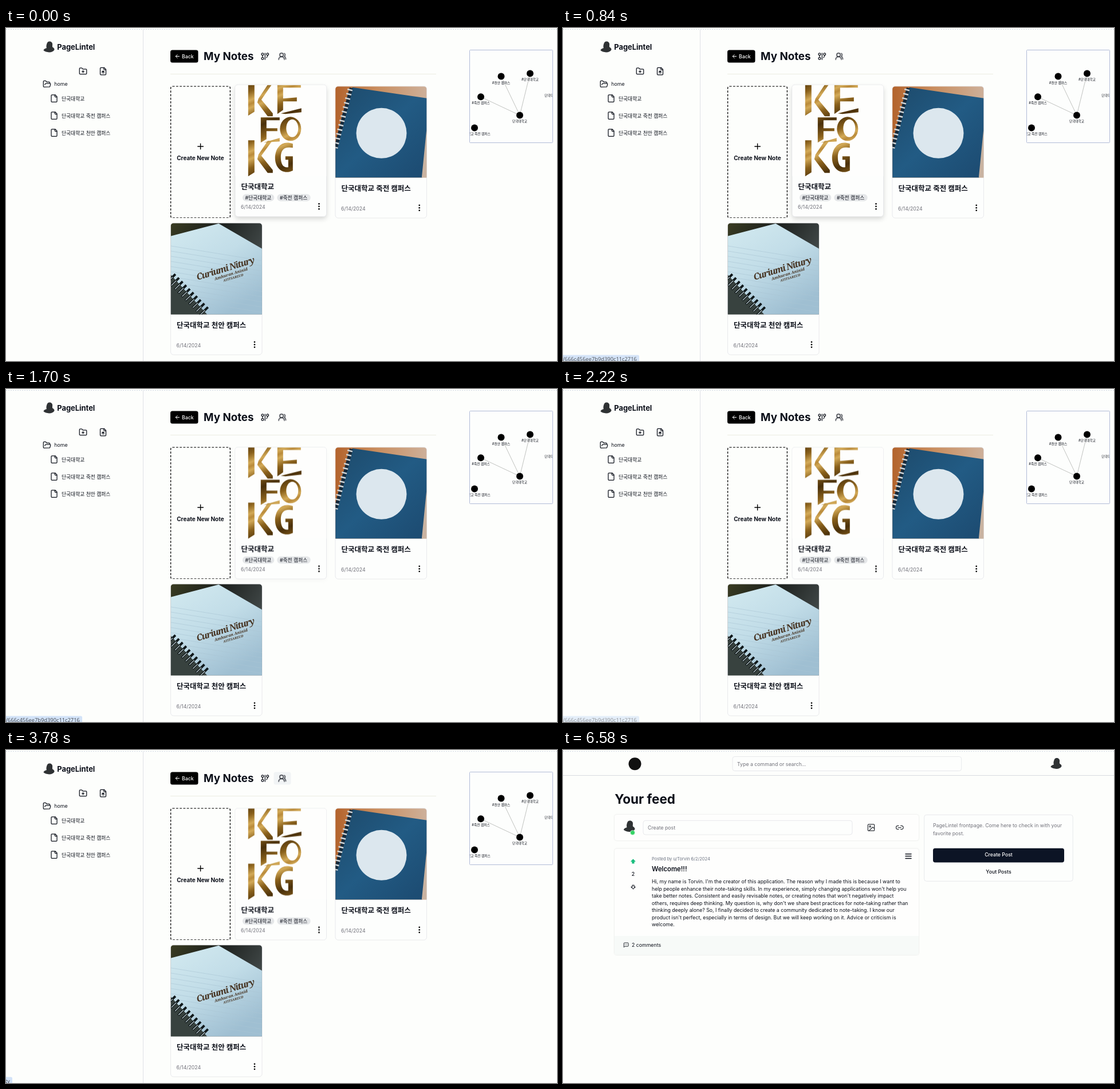
Write an HTML page that moves like this. It is 962 px wide and 582 px high and loops after 8 s.

```html
<!DOCTYPE html>
<html lang="ko">
<head>
<meta charset="utf-8">
<title>Notes and feed</title>
<style>
html, body { margin: 0; width: 100%; height: 100%; overflow: hidden; background: #fdfefc; }
svg.stage { display: block; width: 962px; height: 582px; }
text { font-family: Inter, "Noto Sans CJK KR", "Noto Sans CJK", sans-serif; font-size: 8.75px; fill: #0b0f19; white-space: pre; }
.b { font-weight: 700; }
.sb { font-weight: 600; }
.m { font-weight: 500; }
.mid { text-anchor: middle; }
.end { text-anchor: end; }
.grey { fill: #71717a; }
.white { fill: #fff; }
.title { font-size: 12.5px; font-weight: 600; }
.graph text { font-size: 5.7px; text-anchor: middle; }
.status text { font-family: "Noto Sans", "Open Sans", sans-serif; font-size: 9.3px; fill: #4b5158; }
.status path { fill: #d3e3f8; }
.icon { fill: none; stroke: #0b0f19; stroke-width: 2; stroke-linecap: round; stroke-linejoin: round; }
.box { fill: #fdfefd; stroke: #e2e4e8; stroke-width: .8; }
.soft { filter: drop-shadow(0 .7px 1.2px rgba(0,0,0,.13)); }
.dashed { box-sizing: border-box; width: 168px; height: 370px; border: 2px dashed #000; border-radius: 6px; }
.script text { font: italic 700 15.6px "Noto Serif", serif; fill: #463321; }

#notes, #feed, #hover, #chip, #link, #lift, #shade, #logo { animation: 8s linear infinite; }
#notes, #feed, #hover, #logo { animation-timing-function: step-end; }
#notes { animation-name: notes; }
#feed { animation-name: feed; }
#hover { animation-name: hover; }
#logo { animation-name: logo; }
#link { animation-name: link; }
#chip { animation-name: chip; }
#lift { animation-name: lift; }
#shade { animation-name: shade; }
@keyframes notes { 0% { visibility: visible } 59.25%, 100% { visibility: hidden } }
@keyframes feed { 0% { visibility: hidden } 59.25%, 100% { visibility: visible } }
@keyframes hover { 0% { opacity: 0 } 47.25%, 100% { opacity: 1 } }
@keyframes logo { 0% { opacity: 0 } 61.5%, 100% { opacity: 1 } }
@keyframes link { 0%, 3.5% { opacity: 0 } 11%, 24.25% { opacity: 1 } 32.5%, 100% { opacity: 0 } }
@keyframes chip { 0%, 47.24% { opacity: 0 } 47.25%, 70.25% { opacity: 1 } 75.25%, 100% { opacity: 0 } }
@keyframes lift {
  0%, 14% { transform: translateY(-2.5px); animation-timing-function: ease-in-out }
  22.75%, 100% { transform: none }
}
@keyframes shade { 0%, 14% { opacity: 1 } 22.75%, 100% { opacity: 0 } }
</style>
</head>
<body>
<svg class="stage" viewBox="0 0 962 582">
<defs>
  <symbol id="file" viewBox="0 0 24 24"><path d="M15 2H6a2 2 0 0 0-2 2v16a2 2 0 0 0 2 2h12a2 2 0 0 0 2-2V7ZM14 2v4a2 2 0 0 0 2 2h4"/></symbol>
  <symbol id="folder-plus" viewBox="0 0 24 24"><path d="M12 10v6M9 13h6M20 20a2 2 0 0 0 2-2V8a2 2 0 0 0-2-2h-7.9a2 2 0 0 1-1.69-.9L9.6 3.9A2 2 0 0 0 7.93 3H4a2 2 0 0 0-2 2v13a2 2 0 0 0 2 2Z"/></symbol>
  <symbol id="folder-open" viewBox="0 0 24 24"><path d="m6 14 1.5-2.9A2 2 0 0 1 9.24 10H20a2 2 0 0 1 1.94 2.5l-1.54 6a2 2 0 0 1-1.95 1.5H4a2 2 0 0 1-2-2V5a2 2 0 0 1 2-2h3.9a2 2 0 0 1 1.69.9l.81 1.2a2 2 0 0 0 1.67.9H18a2 2 0 0 1 2 2v2"/></symbol>
  <symbol id="graph" viewBox="0 0 24 24"><circle cx="5" cy="6" r="3"/><path d="M5 9v6"/><circle cx="5" cy="18" r="3"/><path d="M12 3v18"/><circle cx="19" cy="6" r="3"/><path d="M16 15.7A9 9 0 0 0 19 9"/></symbol>
  <symbol id="users" viewBox="0 0 24 24"><path d="M18 21a8 8 0 0 0-16 0"/><circle cx="10" cy="8" r="5"/><path d="M22 20c0-3.37-2-6.5-4-8a5 5 0 0 0-.45-8.3"/></symbol>
  <symbol id="image" viewBox="0 0 24 24"><rect x="3" y="3" width="18" height="18" rx="2"/><circle cx="9" cy="9" r="2"/><path d="m21 15-3.1-3.1a2 2 0 0 0-2.8 0L6 21"/></symbol>
  <symbol id="chain" viewBox="0 0 24 24"><path d="M9 17H7A5 5 0 0 1 7 7h2M15 7h2a5 5 0 1 1 0 10h-2M8 12h8"/></symbol>
  <symbol id="vote" viewBox="0 0 24 24"><path d="M9 18v-6H5l7-7 7 7h-4v6Z"/></symbol>
  <symbol id="comment" viewBox="0 0 24 24"><path d="M21 15a2 2 0 0 1-2 2H7l-4 4V5a2 2 0 0 1 2-2h14a2 2 0 0 1 2 2ZM8 10h.01M12 10h.01M16 10h.01"/></symbol>
  <symbol id="avatar" viewBox="0 0 20 20"><path fill="#2f3234" d="M10.5.6c3.600-.4 6 2.300 5.600 5.700-.1 2.200-.6 3.300.5 4.400 1.900 1 3.100 2.500 2.900 4.300-1.500 3-5.200 4.600-9.300 4.500-4-.1-7.200-1.300-9.800-3.400.6-2.200 2.700-3.200 5.500-4.100C5 9.600 5.500 6.600 6.500 4 7.300 2 8.500.8 10.500.6Z"/></symbol>
  <g id="dots"><circle r="1.35" cy="-4.5"/><circle r="1.35"/><circle r="1.35" cy="4.5"/></g>
  <clipPath id="photo"><path d="M.4 160V5A4.600 4.600 0 0 1 5 .4H155A4.600 4.600 0 0 1 159.600 5V160Z"/></clipPath>
  <clipPath id="map"><rect x="810" y="39" width="144" height="161"/></clipPath>
  <linearGradient id="gold" gradientUnits="userSpaceOnUse" x1="0" y1="0" x2="16" y2="38" spreadMethod="reflect">
    <stop offset="0" stop-color="#4a300a"/><stop offset=".5" stop-color="#8a611c"/><stop offset=".85" stop-color="#d3aa58"/><stop offset="1" stop-color="#b98a3a"/>
  </linearGradient>
  <linearGradient id="cover" x2="1" y2="1"><stop offset="0" stop-color="#1d4a6b"/><stop offset=".5" stop-color="#225b84"/><stop offset="1" stop-color="#1c4a70"/></linearGradient>
  <linearGradient id="wood" x2="1"><stop offset="0" stop-color="#b3632c"/><stop offset=".45" stop-color="#c98d5e"/><stop offset="1" stop-color="#cdb09a"/></linearGradient>
  <linearGradient id="paper" x2=".6" y2="1"><stop offset="0" stop-color="#d3eaf0"/><stop offset=".5" stop-color="#c2dde8"/><stop offset="1" stop-color="#9fbfd2"/></linearGradient>
  <linearGradient id="desk" x2="1" y2=".6"><stop offset="0" stop-color="#3a3c22"/><stop offset=".4" stop-color="#1b1f1c"/><stop offset="1" stop-color="#4d5556"/></linearGradient>
</defs>

<rect width="962" height="582" fill="#fdfefc"/>

<g id="notes">
  <path d="M239.5 3V582" stroke="#dfe1e6"/>
  <use href="#avatar" x="65" y="23" width="20" height="20"/>
  <text class="b" x="89.3" y="37.5" style="font-size:12.9px">PageLintel</text>
  <g class="icon">
    <use href="#folder-plus" x="127" y="68" width="15" height="15"/>
    <use href="#file" x="162" y="68" width="15" height="15"/>
    <path d="M169.5 79.300v-4.300m-2 2 2-2 2 2" stroke-width="1.25"/>
    <use href="#folder-open" x="64" y="90.5" width="15" height="15"/>
    <use href="#file" x="76.5" y="115.5" width="15" height="15"/>
    <use href="#file" x="76.5" y="145.5" width="15" height="15"/>
    <use href="#file" x="76.5" y="175.5" width="15" height="15"/>
  </g>
  <text x="84.3" y="101.2">home</text>
  <text x="97" y="126.5">단국대학교</text>
  <text x="97" y="156.5">단국대학교 죽전 캠퍼스</text>
  <text x="97" y="186.5">단국대학교 천안 캠퍼스</text>

  <rect x="287" y="38.5" width="48.5" height="22" rx="3.5" fill="#000"/>
  <path d="M302.5 49.5h-6.300m3-3-3 3 3 3" fill="none" stroke="#fff" stroke-linecap="round" stroke-linejoin="round"/>
  <text class="m white" x="307" y="52.6">Back</text>
  <text class="b" x="345" y="56.1" style="font-size:18.75px">My Notes</text>
  <rect id="hover" x="467.5" y="38.5" width="30" height="22" rx="3.5" fill="#f1f4f5"/>
  <g class="icon">
    <use href="#graph" x="444.8" y="42" width="15" height="15"/>
    <use href="#users" x="474.8" y="42" width="15" height="15"/>
  </g>
  <path d="M287 80.5H751" stroke="#ecece2"/>

  <foreignObject width="168" height="370" transform="translate(287 101.2) scale(.625)"><div class="dashed"></div></foreignObject>
  <path d="M334.8 207h9.600M339.6 202.200v9.600" stroke="#000" stroke-width="1.4" stroke-linecap="round"/>
  <text class="b mid" x="339.5" y="230.6" style="font-size:10px">Create New Note</text>

  <g id="lift">
    <rect id="shade" x="400" y="102" width="159.5" height="230" rx="5" fill="#fff" style="filter:drop-shadow(0 4px 4px rgba(0,0,0,.16))"/>
    <rect class="box" x="400" y="101.6" width="159.5" height="230.5" rx="5"/>
    <g transform="translate(399.8 101.8)" clip-path="url(#photo)">
      <rect width="160" height="160" fill="#fefefd"/>
      <g fill="url(#gold)">
        <path d="M23 0H34V47L23 54ZM41 24 57 0H64L46 26 66 50V55H57L39 31Z"/>
        <path d="M74 0H84V44L74 51ZM84 0H115V5H84ZM84 24 108 22V29H84ZM80 50 116 41V48L88 51Z"/>
        <path d="M45 57H55V95L45 101ZM55 57H78V62H55ZM55 76H74V81H55ZM50 101 78 93V99Z"/>
        <path d="M23 97H34V153L23 160ZM41 122 57 98H65L46 124 66 149V154H57L39 130Z"/>
        <ellipse cx="97" cy="77" rx="18.5" ry="21"/>
        <path d="M101 103C82 96 70 110 70 128S84 158 101 150V125H88V131H93V144Q80 146 80 126T101 110Z"/>
      </g>
      <ellipse cx="100" cy="76" rx="10.500" ry="15.500" fill="#fefefd"/>
    </g>
    <text class="title" x="410.5" y="284.5">단국대학교</text>
    <rect x="413" y="292.7" width="55.3" height="12.5" rx="6.2" fill="#e5e7e9"/>
    <rect x="473.3" y="292.7" width="58.3" height="12.5" rx="6.2" fill="#e5e7e9"/>
    <text x="417.5" y="302.2">#단국대학교</text>
    <text x="478" y="302.2">#죽전 캠퍼스</text>
    <text class="grey" x="410" y="318.6">6/14/2024</text>
    <use href="#dots" x="546.5" y="314.3"/>
  </g>

  <rect class="box" x="575" y="101.6" width="159.5" height="230.5" rx="5"/>
  <g transform="translate(574.8 101.8)" clip-path="url(#photo)">
    <rect width="160" height="160" fill="url(#wood)"/>
    <path d="M30 2 160 21V77L152 160H0V112L12 50Z" fill="url(#cover)"/>
    <path d="M160 70V160H151Z" fill="#c9b3a1"/>
    <path d="M28 3Q15 52 1 108" fill="none" stroke="#172b3c" stroke-width="6"/>
    <path d="M26 5Q14 52 0 108" fill="none" stroke="#cfd5d8" stroke-width="9" stroke-dasharray="2.6 5.4"/>
    <circle cx="80.7" cy="82" r="44" fill="#dce7ee"/>
  </g>
  <text class="title" x="585.5" y="284.5">단국대학교 죽전 캠퍼스</text>
  <text class="grey" x="585" y="318.6">6/14/2024</text>
  <use href="#dots" x="721.7" y="314.3"/>

  <rect class="box" x="287.5" y="340.6" width="159.5" height="230.5" rx="5"/>
  <g transform="translate(287.3 340.8)" clip-path="url(#photo)">
    <rect width="160" height="160" fill="url(#desk)"/>
    <path d="M0 23 84 1 160 45V160H62L0 92Z" fill="url(#paper)"/>
    <path d="M0 40 160 66M0 49 160 75M0 58 160 84M0 67 160 93M0 76 160 102M0 85 160 111M8 95 160 120M18 106 160 129M30 117 160 138M40 128 160 147M50 139 160 156" stroke="#a9c4d3" stroke-width=".6"/>
    <path d="M0 90 64 160H0Z" fill="#38423f"/>
    <path d="M0 95 62 158" stroke="#10181a" stroke-width="20" stroke-dasharray="4 5"/>
    <path d="M-1 98 59 160" stroke="#aebcc0" stroke-width="12" stroke-dasharray="1.4 7.6"/>
    <g class="script" transform="translate(47 100) rotate(-17)">
      <text style="letter-spacing:-1.3px">Curiumi Nitury</text>
      <text x="29" y="9" style="font-size:7px">Amhuran Aninid</text>
      <text x="43" y="16" style="font-size:5.5px">ATITSAREUD</text>
    </g>
  </g>
  <text class="title" x="298" y="523.5">단국대학교 천안 캠퍼스</text>
  <text class="grey" x="297.5" y="557.5">6/14/2024</text>
  <use href="#dots" x="434" y="553.3"/>

  <rect x="809.5" y="38.5" width="145" height="162" rx="1" fill="#fdfefd" stroke="#a9b4d3" stroke-width=".9"/>
  <g class="graph" clip-path="url(#map)">
    <path d="M864.5 84.5 897 152.5 915 79.5M829 120.5 897 152.5" fill="none" stroke="#b9bbb8" stroke-width=".9"/>
    <circle cx="864.5" cy="84.5" r="6"/><circle cx="915" cy="79.5" r="6"/><circle cx="829" cy="120.3" r="6"/>
    <circle cx="897" cy="152.5" r="6"/><circle cx="818" cy="174.5" r="6"/>
    <text x="864.5" y="97.5">#천안 캠퍼스</text>
    <text x="915" y="92.3">#단국대학교</text>
    <text x="829" y="133.2">#죽전 캠퍼스</text>
    <text x="897" y="165.3">단국대학교</text>
    <text x="818" y="187.2">단국대학교 죽전 캠퍼스</text>
    <text x="968" y="119.5">단국대학교 천안 캠퍼스</text>
  </g>

  <g id="link" class="status">
    <path d="M0 571.5H130.500a2.500 2.500 0 0 1 2.500 2.500V582H0Z"/>
    <text class="end" x="128.8" y="581.8">/666c456ee7b9d390c11c2716</text>
  </g>
</g>

<g id="feed">
  <path d="M0 44.5H962" stroke="#d9dbe0"/>
  <circle id="logo" cx="125.5" cy="24.3" r="11" fill="#111"/>
  <rect class="box" x="296" y="11.5" width="399.7" height="25" rx="4"/>
  <text class="grey" x="304" y="27.5">Type a command or search...</text>
  <use href="#avatar" x="851" y="13.5" width="20" height="20"/>
  <text class="b" x="90.3" y="93.6" style="font-size:22.5px">Your feed</text>

  <rect class="soft" x="90" y="113" width="531" height="45" rx="4" fill="#fefefd"/>
  <use href="#avatar" x="105.5" y="123" width="20.5" height="20.5"/>
  <circle cx="121.5" cy="144.4" r="4" fill="#34d365" stroke="#fff" stroke-width=".6"/>
  <rect class="box" x="140" y="123.3" width="365" height="24.7" rx="4"/>
  <text class="grey" x="148" y="139.2">Create post</text>
  <g class="icon" style="stroke:#33373d">
    <use href="#image" x="530.5" y="128" width="15" height="15"/>
    <use href="#chain" x="580.3" y="128" width="15" height="15"/>
  </g>

  <rect class="soft" x="90" y="172.5" width="531" height="185.5" rx="4" fill="#fefefd"/>
  <path d="M90 325H621V354a4 4 0 0 1-4 4H94a4 4 0 0 1-4-4Z" fill="#f7faf8"/>
  <g class="icon">
    <use href="#vote" x="116.2" y="188.5" width="12.5" height="12.5" style="fill:#18bd7d;stroke:#18bd7d"/>
    <use href="#vote" transform="rotate(180 122.5 239.3)" x="116.2" y="233" width="12.5" height="12.5"/>
    <use href="#comment" x="105" y="335.7" width="10.5" height="10.5"/>
    <path d="M598 181.7h10M598 185.6h10M598 189.5h10" stroke-width="1.5"/>
  </g>
  <text class="m mid" x="122.5" y="220.2">2</text>
  <text x="155" y="193" style="font-size:7.5px;fill:#6b7280">Posted by u/Torvin 6/2/2024</text>
  <text class="sb" x="155" y="212.2" style="font-size:11.25px">Welcome!!!</text>
  <text x="155" y="233.2">Hi, my name is Torvin. I'm the creator of this application. The reason why I made this is because I want to</text>
  <text x="155" y="245.7">help people enhance their note-taking skills. In my experience, simply changing applications won't help you</text>
  <text x="155" y="258.2">take better notes. Consistent and easily revisable notes, or creating notes that won't negatively impact</text>
  <text x="155" y="270.7">others, requires deep thinking. My question is, why don't we share best practices for note-taking rather than</text>
  <text x="155" y="283.2">thinking deeply alone? So, I finally decided to create a community dedicated to note-taking. I know our</text>
  <text x="155" y="295.7">product isn't perfect, especially in terms of design. But we will keep working on it. Advice or criticism is</text>
  <text x="155" y="308.2">welcome.</text>
  <text x="120" y="344.2">2 comments</text>

  <rect class="box" x="630.7" y="113.3" width="259.5" height="116" rx="4"/>
  <text class="grey" x="646" y="134.5">PageLintel frontpage. Come here to check in with your</text>
  <text class="grey" x="646" y="149.3">favorite post.</text>
  <rect x="646" y="171.8" width="229" height="24.7" rx="3.7" fill="#0c1425"/>
  <text class="m mid white" x="760.5" y="186.4">Create Post</text>
  <text class="m mid" x="760.5" y="216.3">Yout Posts</text>
</g>

<g id="chip" class="status">
  <path d="M0 571.5H8.500a2.500 2.500 0 0 1 2.500 2.500V582H0Z"/>
  <text class="end" x="6.8" y="581.8">ty</text>
</g>
<path d="M0 2.5H962" stroke="#d3dae4" stroke-dasharray="2 2"/>
</svg>
</body>
</html>
```
